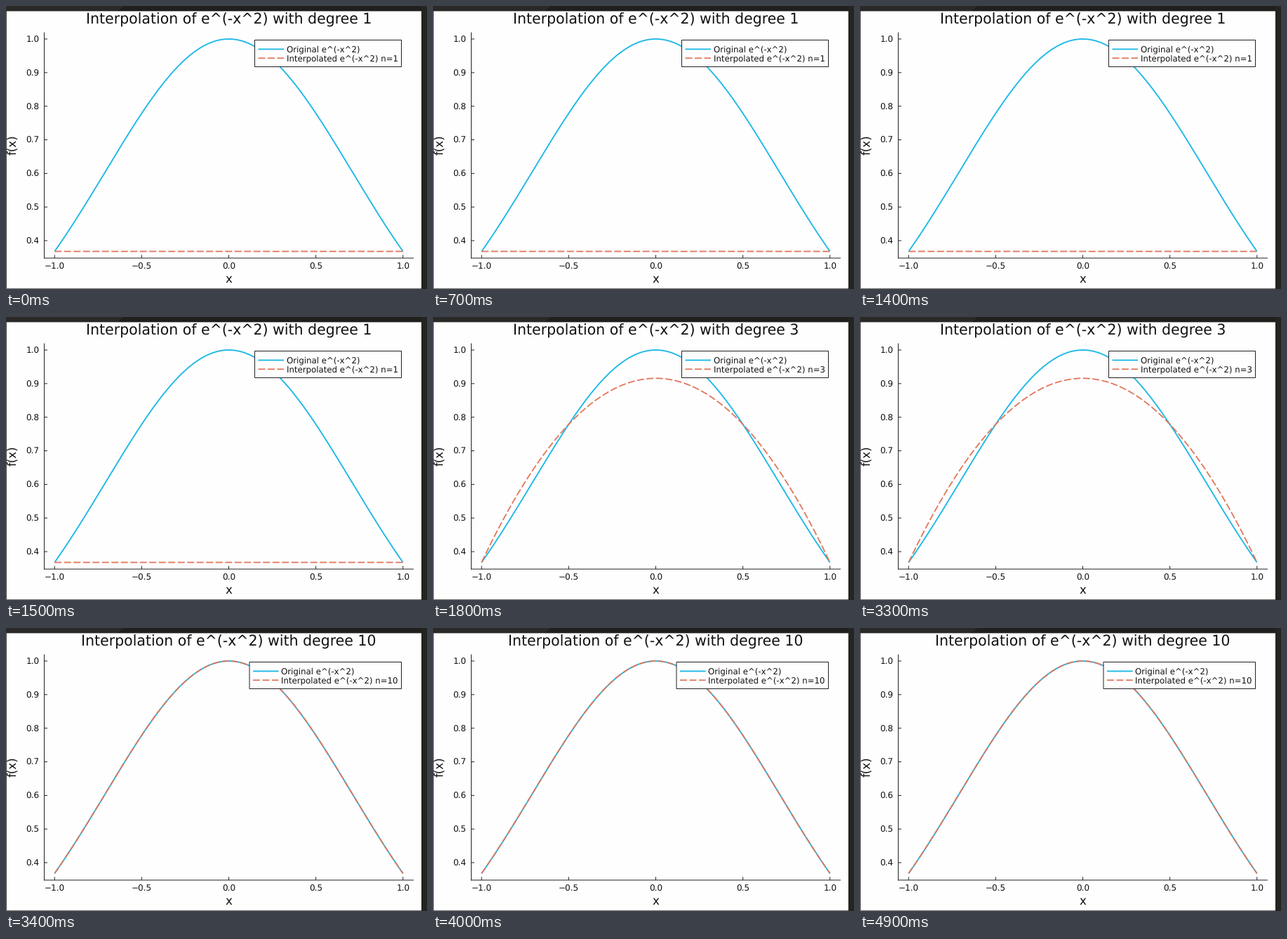
A matplotlib script for the animation above (5000 ms loop, 600x403 px).

```python
import matplotlib.pyplot as plt
import numpy as np
from matplotlib.animation import FuncAnimation
from matplotlib.patches import Polygon, Rectangle

W, H, DPI = 600, 403, 64
PT = 72 / DPI  # points per pixel
FRAMES, INTERVAL = 50, 100
DEGREES = (1, 3, 10)
BLUE, ORANGE, INK, PAPER = "#1fb9e6", "#e0765a", "#222222", "#fffeff"
SMALL, TICK, MEDIUM, LARGE = 11.75, 12.0, 16.6, 20.5

plt.rcParams.update({
    "font.family": "DejaVu Sans",
    "text.hinting": "none",
    "path.snap": False,
    "lines.dash_capstyle": "butt",
    "lines.solid_capstyle": "butt",
    "lines.scale_dashes": False,
    "toolbar": "None",
})

fig = plt.figure(figsize=(W / DPI, H / DPI), dpi=DPI, facecolor="#211f1e")
ax = fig.add_axes([0, 0, 1, 1])
ax.set(xlim=(0, W), ylim=(H, 0))
ax.axis("off")


def px(x):
    return 317.5 + 248.25 * np.asarray(x)


def py(y):
    return 47 + 478.5 * (1 - np.asarray(y))


def rect(x0, y0, x1, y1, color, **kw):
    patch = Rectangle((x0, y0), x1 - x0, y1 - y0, fc=color, **kw)
    return ax.add_patch(patch)


def line(xs, ys, color=INK, width=1.0, dashed=False, z=2):
    style = (0, (10 * PT, 3.5 * PT)) if dashed else "-"
    return ax.plot(xs, ys, color=color, lw=width * PT, ls=style, zorder=z)[0]


def label(x, y, text, size, ha="center", **kw):
    return ax.text(x, y, text, size=size * PT, ha=ha, va="baseline",
                   color="#111111", **kw)


def bell(x):
    return np.exp(-x ** 2)


def interpolant(degree):
    """Polynomial through the Chebyshev extreme points."""
    nodes = np.cos(np.pi * np.arange(degree + 1) / degree)
    return np.polyval(np.polyfit(nodes, bell(nodes), degree), grid)


grid = np.linspace(-1, 1, 401)
fits = {n: py(interpolant(n)) for n in DEGREES}

# Dark surround and white page
ax.add_patch(Polygon([(0, 0), (168, 0), (158, 8), (0, 8)], fc="#2b2928", lw=0))
rect(592, 0, W, H, "#242421", lw=0)
rect(0, 7, 1, H, "#4a4847", lw=0)
rect(1, 7.4, 592, 402, PAPER, lw=0)
rect(0, 402, 592, H, "#6a6867", lw=0)

# Axes
line([54.5, 54.5], [37.5, 359.5])
line([54, 581], [359, 359])
for v in (-1, -0.5, 0, 0.5, 1):
    line([px(v)] * 2, [359, 354.5])
    label(px(v), 374.4, f"{v:.1f}".replace("-", "\u2212"), TICK)
for v in np.arange(4, 11) / 10:
    line([54.5, 59], [py(v)] * 2)
    label(47.5, py(v) + 4.7, f"{v:.1f}", TICK, ha="right")
label(317.5, 394.3, "x", MEDIUM)
label(15.6, 197.4, "f(x)", MEDIUM, rotation=90, rotation_mode="anchor")

# Curves
line(px(grid), py(bell(grid)), BLUE, 1.9)
fit_line = line(px(grid), fits[1], ORANGE, 1.8, dashed=True, z=3)

# Legend, anchored to its right edge
frame_box = rect(354.5, 48.5, 563, 86.5, PAPER, ec=INK, lw=PT, zorder=4)
blue_key = line([0, 0], [61.5, 61.5], BLUE, 1.9, z=5)
orange_key = line([0, 0], [74.3, 74.3], ORANGE, 1.8, dashed=True, z=5)
blue_text = label(0, 65.2, "Original e^(-x^2)", SMALL, ha="left", zorder=5)
orange_text = label(0, 78.2, "", SMALL, ha="left", zorder=5)
title = label(317.4, 25.4, "", LARGE)


def update(frame):
    degree = DEGREES[frame * len(DEGREES) // FRAMES]
    fit_line.set_ydata(fits[degree])
    title.set_text(f"Interpolation of e^(-x^2) with degree {degree}")
    orange_text.set_text(f"Interpolated e^(-x^2) n={degree}")
    left = 400.0 if degree < 10 else 392.5
    for text in (blue_text, orange_text):
        text.set_x(left)
    for key in (blue_key, orange_key):
        key.set_xdata([left - 40.5, left - 4])
    frame_box.set_x(left - 45.5)
    frame_box.set_width(563.5 - frame_box.get_x())
    return fit_line, title, frame_box, blue_key, orange_key, blue_text, orange_text


anim = FuncAnimation(fig, update, frames=FRAMES, interval=INTERVAL,
                     repeat=True, repeat_delay=0, blit=False)
plt.show()
```
